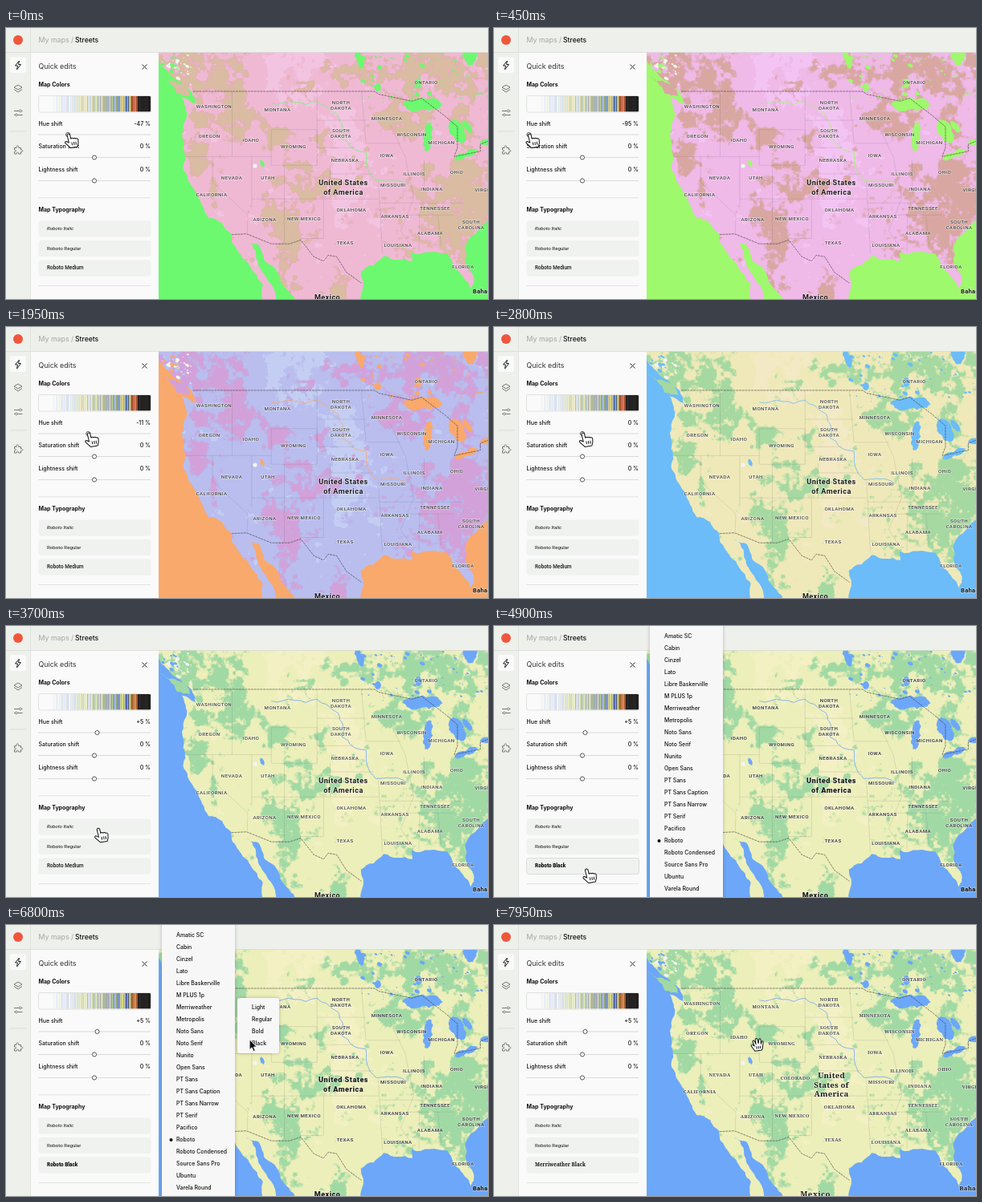
An HTML page with a canvas that plays this animation: 600 px wide and 338 px high, repeating every 8000 ms.

```html
<!DOCTYPE html>
<html lang="en">
<head>
<meta charset="utf-8">
<title>Map style editor</title>
<style>
  html, body { margin: 0; width: 100%; height: 100%; overflow: hidden; background: #fafafa; }
  canvas { display: block; width: 100vw; height: 100vh; }
</style>
</head>
<body>
<canvas id="stage" width="600" height="338"></canvas>
<script>
const W = 600, H = 338, LOOP = 8000;
const ctx = document.getElementById('stage').getContext('2d');
const UI = 'Inter, sans-serif', ROBOTO = 'Roboto, sans-serif', SERIF = '"Noto Serif", serif';

// Timing: keys are [ms, value...]
const HUE_KEYS = [[0, -47], [450, -95], [750, -97], [950, -100], [1650, -100], [1950, -11], [2150, 0], [2900, 0], [3200, 5]];
const CURSOR_KEYS = [[3350, 114, 133], [3900, 115, 303], [5100, 115, 303], [6000, 248, 182],
  [6450, 240, 105], [6900, 312, 148], [7400, 328, 149]];
const MENU_OPEN = 4300, BLACK_AT = 4600, SERIF_AT = 7050, MAP_LAG = 300, DEGREES_PER_PERCENT = 1.8;
const SUBMENUS = [
  { from: 5850, to: 6200, row: 13, items: ['Regular', 'Bold'] },
  { from: 6450, to: SERIF_AT, row: 6, items: ['Light', 'Regular', 'Bold', 'Black'] }
];

const smooth = u => u * u * (3 - 2 * u);
function track(keys, t) {
  const i = keys.findIndex(k => k[0] > t);
  if (i === 0) return keys[0].slice(1);
  if (i < 0) return keys[keys.length - 1].slice(1);
  const a = keys[i - 1], b = keys[i], e = smooth((t - a[0]) / (b[0] - a[0]));
  return a.slice(1).map((v, j) => v + (b[j + 1] - v) * e);
}
const hueAt = t => track(HUE_KEYS, t)[0];

// Noise
function hash(x, y, s) {
  const v = Math.sin(x * 127.1 + y * 311.7 + s * 74.7) * 43758.5453;
  return v - Math.floor(v);
}
function noise(x, y, s) {
  const ix = Math.floor(x), iy = Math.floor(y), u = smooth(x - ix), v = smooth(y - iy);
  const row = j => hash(ix, j, s) * (1 - u) + hash(ix + 1, j, s) * u;
  return row(iy) * (1 - v) + row(iy + 1) * v;
}
const fbm = (x, y, s) => noise(x / 22, y / 22, s) * .38 + noise(x / 10, y / 10, s + 1) * .3 +
  noise(x / 4.5, y / 4.5, s + 2) * .22 + noise(x / 2, y / 2, s + 3) * .1;

// Ground cover: noise raised inside soft ellipses [x, y, rx, ry]
function coverMask(regions, seed, threshold) {
  const c = document.createElement('canvas');
  c.width = W; c.height = H;
  const g = c.getContext('2d'), img = g.createImageData(W, H);
  for (let y = 30; y < H; y++) for (let x = 190; x < W; x++) {
    const bias = regions.reduce((sum, [cx, cy, rx, ry]) =>
      sum + Math.exp(-(((x - cx) / rx) ** 2) - ((y - cy) / ry) ** 2), 0);
    const v = fbm(x, y, seed) + Math.min(.34, bias * .32);
    img.data[(y * W + x) * 4 + 3] = 255 * Math.max(0, Math.min(1, (v - threshold) * 22));
  }
  g.putImageData(img, 0, 0);
  return c;
}
const WOODED = [
  [235, 50, 58, 38], [530, 55, 90, 42], [500, 112, 45, 18],          // northern forest
  [237, 140, 11, 55], [258, 208, 8, 28], [300, 112, 28, 30],         // western ranges
  [335, 148, 16, 26], [372, 208, 30, 46], [328, 228, 15, 36],
  [550, 240, 68, 50], [590, 185, 35, 35],                            // east
  [345, 308, 18, 38], [410, 330, 18, 14]                             // south
];
const forest = coverMask(WOODED, 3, .72), scrub = coverMask(WOODED, 3, .67);
const prairie = coverMask([[350, 50, 42, 34], [415, 110, 36, 36], [420, 190, 45, 45]], 11, .72);

// Mercator projection fitted to the stage
const mercator = lat => Math.log(Math.tan(Math.PI / 4 + lat * Math.PI / 360));
const project = (lon, lat) => [375 + 8.13 * (lon + 105.5), 79 + 466 * (mercator(49) - mercator(lat))];
const places = s => s.split(' ').map(p => project(...p.split(',').map(Number)));

function roughen(points, depth = 3, amount = .13) {
  for (; depth; depth--) {
    points = points.flatMap((p, i) => {
      const q = points[i + 1];
      if (!q) return [p];
      const k = (hash(p[0], q[1], depth) - .5) * 2 * amount;
      return [p, [(p[0] + q[0]) / 2 + (q[1] - p[1]) * k, (p[1] + q[1]) / 2 - (q[0] - p[0]) * k]];
    });
  }
  return points;
}
const toPath = pts => new Path2D('M' + pts.map(p => p.join(' ')).join('L'));
const coast = s => toPath(roughen(places(s)));
const border = s => toPath(places(s));
function lake(lon, lat, rx, ry, turn = 0) {
  const [x, y] = project(lon, lat), pts = [];
  for (let i = 0; i <= 10; i++) {
    const a = i * Math.PI / 5, u = rx * Math.cos(a), v = ry * Math.sin(a);
    pts.push([x + u * Math.cos(turn) - v * Math.sin(turn), y + u * Math.sin(turn) + v * Math.cos(turn)]);
  }
  return toPath(roughen(pts, 2, .2));
}
function scatter(count, x, y, w, h, size, seed) {
  const path = new Path2D();
  for (let i = 0; i < count; i++) {
    const px = x + hash(i, 1, seed) * w, py = y + hash(i, 2, seed) * h, r = .4 + hash(i, 3, seed) ** 3 * size;
    path.moveTo(px + r * 1.6, py);
    path.ellipse(px, py, r * 1.6, r, .5, 0, 7);
  }
  return path;
}

const WATER = [
  coast('-140,54 -130.5,54.2 -127.8,51.5 -125,50 -123.2,49 -122.5,47.6 -124.7,48.4 -124,46.2 -124.5,42.8 -124.4,40.4 -122.5,37.8 -120.6,34.6 -118.5,34 -117.1,32.5 -116,30.2 -114.2,28.2 -112.3,25.8 -111.5,20 -140,20'),
  coast('-114.8,31.8 -113,31.2 -112,29 -109.2,25.8 -107,22 -109.5,22 -111.5,26.3 -113,28.5 -114.8,31.8'),
  coast('-97.8,22 -97.3,27.6 -93.8,29.7 -89.4,29 -89.5,30.2 -84,30 -82.6,27.8 -80.4,25.2 -80,26.8 -81.3,31 -77,34.6 -70,35 -70,20'),
  lake(-87.8, 47.6, 25, 8), lake(-87, 44.2, 6, 19, .12), lake(-82.5, 44.8, 9, 16, -.5), lake(-81, 45.3, 4, 9, -.7),
  lake(-81.2, 42.2, 16, 4, -.4), lake(-77.8, 43.6, 10, 4), lake(-80.5, 53, 9, 20), lake(-97.5, 52.2, 4, 13, -.3),
  lake(-94.7, 49.4, 4, 5), lake(-88.5, 49.8, 4, 6), lake(-112.4, 41.2, 2.3, 5, -.4),
  scatter(70, 440, 31, 160, 62, 1.8, 5), scatter(26, 190, 36, 26, 30, 1.5, 9)
];
const ISLAND = coast('-128.3,50.7 -125,49.8 -123.4,48.5 -125.5,48.8 -128.3,50.7');
const SNOW = scatter(28, 194, 34, 38, 40, 1.6, 21);
const RIVER = coast('-111,47.8 -104,48 -100.7,46.5 -100.2,44 -96.5,42.5 -95,39.2 -90.2,38.7');
const NATIONS = [
  '-123,49 -95.2,49 -94.5,48.7 -89.5,48 -88,48.3 -84.5,46.5 -82.5,45.3 -82.5,43 -83,42 -79,42.6 -79,43.4 -76,44.2',
  '-117.1,32.5 -114.8,32.6 -111,31.3 -108.2,31.3 -106.5,31.8 -104.5,29.6 -103,29 -102.3,29.8 -101,29.6 -99.5,27.5 -97.2,26'
].map(border);
const STATES = [
  '-117,49 -117,42', '-124.2,42 -111,42', '-120,42 -120,39 -114.6,35 -114.7,32.7', '-114,42 -114,36',
  '-111,45 -111,41 -104,41 -104,45 -111,45', '-109,41 -109,31.4', '-114,37 -94.6,37', '-104,49 -104,43 -98.5,43',
  '-104,46 -96.5,46', '-102,41 -102,37', '-102,40 -95.3,40', '-103,37 -103,32 -106.6,32',
  '-97.2,49 -96.5,43.5 -91.2,43.5', '-94.6,39 -94,30', '-94.5,36.5 -81.7,36.5',
  '-92.8,45.5 -90.5,42 -89.2,37 -91.2,33 -89.6,31', '-90,35 -83,35', '-87.6,41.7 -87.6,38', '-88.3,35 -88.4,30.3', '-85.5,35 -85,31'
].map(border);

const LABELS = `WASHINGTON 259 98|MONTANA 338 102|NORTH 417 93|DAKOTA 417 100|MINNESOTA 474 113|ONTARIO 523 68
SOUTH 417 128|DAKOTA 417 135|WISCONSIN 505 133|MICHIGAN 542 143|OREGON 253 135|IDAHO 305 140|WYOMING 358 148
NEBRASKA 422 165|IOWA 474 159|ILLINOIS 508 182|OHIO 561 180|NEVADA 281 187|UTAH 326 187|MISSOURI 482 196
INDIANA 530 201|VIRGINIA 598 202|CALIFORNIA 256 208|OKLAHOMA 430 227|TENNESSEE 534 225|ARKANSAS 484 235
ARIZONA 322 239|NEW_MEXICO 371 238|ALABAMA 528 256|SOUTH 579 242|CAROLINA 579 249|TEXAS 422 268|LOUISIANA 488 271
FLORIDA 569 298`.split(/[|\n]/).map(s => s.split(' '));
const FONTS = ['Amatic SC', 'Cabin', 'Cinzel', 'Lato', 'Libre Baskerville', 'M PLUS 1p', 'Merriweather', 'Metropolis',
  'Noto Sans', 'Noto Serif', 'Nunito', 'Open Sans', 'PT Sans', 'PT Sans Caption', 'PT Sans Narrow', 'PT Serif',
  'Pacifico', 'Roboto', 'Roboto Condensed', 'Source Sans Pro', 'Ubuntu', 'Varela Round'];

// Drawing helpers
function text(str, x, y, font, color = '#111', align = 'left') {
  ctx.font = font; ctx.fillStyle = color; ctx.textAlign = align; ctx.textBaseline = 'middle';
  ctx.fillText(str, x, y);
}
function outline(color, width, path) {
  ctx.strokeStyle = color; ctx.lineWidth = width;
  path ? ctx.stroke(path) : ctx.stroke();
}
function rect(x, y, w, h, fill, radius = 0, stroke) {
  ctx.beginPath(); ctx.roundRect(x, y, w, h, radius);
  ctx.fillStyle = fill; ctx.fill();
  if (stroke) outline(stroke, .7);
}
function circle(x, y, r, fill, stroke) {
  ctx.beginPath(); ctx.arc(x, y, r, 0, 7);
  ctx.fillStyle = fill; ctx.fill();
  if (stroke) outline(stroke, 1);
}
function popup(x, y, w, h, radius) {
  ctx.save();
  ctx.shadowColor = 'rgba(0,0,0,.25)'; ctx.shadowBlur = 4;
  rect(x, y, w, h, '#f7f7f7', radius);
  ctx.restore();
}

const tintLayer = document.createElement('canvas');
tintLayer.width = W; tintLayer.height = H;
const tintCtx = tintLayer.getContext('2d');
function drawMask(mask, color) {
  tintCtx.globalCompositeOperation = 'copy';
  tintCtx.drawImage(mask, 0, 0);
  tintCtx.globalCompositeOperation = 'source-in';
  tintCtx.fillStyle = color;
  tintCtx.fillRect(0, 0, W, H);
  ctx.drawImage(tintLayer, 0, 0);
}

function mapLabel(str, x, y, font, spacing, color) {
  ctx.letterSpacing = spacing + 'px';
  ctx.font = font; ctx.textAlign = 'center'; ctx.textBaseline = 'middle'; ctx.lineJoin = 'round';
  ctx.strokeStyle = 'rgba(255,255,255,.45)'; ctx.lineWidth = 1.5;
  ctx.strokeText(str, x, y);
  text(str, x, y, font, color, 'center');
  ctx.letterSpacing = '0px';
}

function drawMap(t) {
  const shift = DEGREES_PER_PERCENT * hueAt(t - MAP_LAG);
  const tone = (h, s, l) => `hsl(${h + shift + 360} ${s}% ${l}%)`;
  const water = tone(206, 92, 70), wood = tone(114, 42, 74);
  rect(190, 30, 410, 308, tone(54, 62, 83));
  drawMask(prairie, tone(47, 66, 86));
  drawMask(scrub, tone(78, 50, 79));
  drawMask(forest, wood);
  ctx.fillStyle = '#f2f3ee';
  ctx.fill(SNOW);
  ctx.fillStyle = water;
  WATER.forEach(p => ctx.fill(p));
  outline(water, .8, RIVER);
  ctx.fillStyle = wood;
  ctx.fill(ISLAND);
  circle(310, 172, 2.6, '#f4f4f2');
  STATES.forEach(p => outline('rgba(90,90,100,.25)', .6, p));
  ctx.setLineDash([3, .8]);
  NATIONS.forEach(p => outline('rgba(60,55,60,.65)', .9, p));
  ctx.setLineDash([]);

  const serif = t >= SERIF_AT, black = t >= BLACK_AT;
  const small = serif ? `600 5.9px ${SERIF}` : `${black ? 700 : 500} 6.2px ${ROBOTO}`;
  const large = serif ? `900 9.6px ${SERIF}` : `${black ? 900 : 600} 9.1px ${ROBOTO}`;
  const state = (name, x, y) => mapLabel(name, x, y, small, serif ? .25 : .4, '#484848');
  LABELS.forEach(([name, x, y]) => state(name.replace('_', ' '), +x, +y));
  if (serif) state('COLORADO', 375, 191);
  const country = serif ? ['United', 'States of', 'America'] : ['United States', 'of America'];
  country.forEach((line, i) => mapLabel(line, 420, (serif ? 188 : 193.5) + i * 11.8, large, serif ? .2 : .5, '#1c1c1c'));
  mapLabel('Mexico', 400, 336.5, large, .4, '#1c1c1c');
  mapLabel('Bahamas', 598, 329, large.replace(/9\.\dpx/, '7.8px'), .2, '#1c1c1c');
}

const ICONS = [
  'M16.5 41 L11.5 47 H14.5 L13.5 52 L18.5 45.5 H15.5 Z',
  'M15 71 L20 74 L15 77 L10 74 Z M10 76.5 L15 80 L20 76.5',
  'M10 103.5 H16.5 M19 103.5 H20.5 M10 108.5 H11.5 M14 108.5 H20.5 M17.8 102 a1.4 1.4 0 1 0 .01 0 M12.8 107 a1.4 1.4 0 1 0 .01 0',
  'M10.5 149.5 H13 C12 146 16.5 146 15.8 149.5 H18.5 V152 C21.5 151.5 21.5 155 18.5 154.5 V157 H15.5 C16 154.5 13 154.5 13.3 157 H10.5 V154.3 C13 154.7 13 151.5 10.5 152 Z'
].map(d => new Path2D(d));

// Stripes run from white through pale and vivid tones to black
function drawPalette(shift) {
  const hues = [52, 210, 75, 225, 60, 215];
  for (let i = 0; i < 139; i++) {
    const u = i / 138, plain = u < .12 || u > .89;
    const hue = u > .82 ? 15 : hues[Math.floor(hash(i, 4, 1) * hues.length)];
    const sat = plain ? 4 : 15 + 50 * hash(i, 5, 1);
    const light = u < .12 ? 98 : plain ? 10 + hash(i, 6, 1) * 8 : 97 - 45 * u ** 2 - hash(i, 6, 1) * 36 * u ** 1.4;
    rect(41 + i, 85, 1.1, 19.5, `hsl(${hue + shift} ${sat}% ${light}%)`);
  }
  ctx.beginPath(); ctx.roundRect(40.5, 84.5, 140, 20.5, 2);
  outline('#d9dbd8', .8);
}

function slider(name, value, y) {
  const font = `500 7px ${UI}`;
  text(name, 40.5, y, font);
  text(`${value > 0 ? '+' : ''}${value} %`, 180, y, font, '#111', 'right');
  rect(40, y + 13, 140, 1, '#d9dbd8');
  circle(110 + value * .7, y + 13.5, 2.6, '#fff', '#555');
}

function drawPanel(t) {
  const hue = Math.round(hueAt(t));
  rect(0, 0, W, 30, '#eef0ec');
  rect(0, 30, 30, 308, '#eef0ec');
  rect(30, 30, 160, 308, '#fafafa');
  rect(0, 30, W, .7, '#d8dad6');
  rect(30, 0, .7, H, '#d8dad6');
  circle(15, 15, 6, '#f0563c');
  text('My maps /', 40.5, 15.5, `8.8px ${UI}`, '#a4a6a3');
  text('Streets', 86, 15.5, `500 8.6px ${UI}`);
  rect(5, 36, 20, 20, '#fafafa', 3);
  ICONS.forEach((p, i) => outline(i ? '#777' : '#222', 1, p));
  rect(5, 128.5, 20, .8, '#d4d6d2');

  text('Quick edits', 40.5, 48.5, `8.9px ${UI}`, '#333');
  ctx.beginPath();
  ctx.moveTo(169.5, 45.5); ctx.lineTo(175.5, 51.5); ctx.moveTo(175.5, 45.5); ctx.lineTo(169.5, 51.5);
  outline('#333', 1);
  text('Map Colors', 40.5, 71, `700 7px ${UI}`);
  drawPalette(t > 2900 ? hue * DEGREES_PER_PERCENT : 0);
  slider('Hue shift', hue, 119.5);
  slider('Saturation shift', 0, 148);
  slider('Lightness shift', 0, 177);
  rect(40, 211.5, 140, .8, '#d9dbd8');
  text('Map Typography', 40.5, 226.5, `700 7px ${UI}`);

  const hover = t > 3850 && t < 5150;
  for (let i = 0; i < 3; i++) rect(40.5, 240.5 + i * 24.5, 140, 20, '#f0f2ef', 3, hover && i === 2 ? '#cfd3cd' : null);
  text('Roboto Italic', 51, 250.5, `italic 6.1px ${ROBOTO}`);
  text('Roboto Regular', 51, 275, `6.2px ${ROBOTO}`);
  if (t >= SERIF_AT) text('Merriweather Black', 51, 299.5, `900 6.2px ${SERIF}`);
  else if (t >= BLACK_AT) text('Roboto Black', 51, 299.5, `900 6.4px ${ROBOTO}`);
  else text('Roboto Medium', 51, 299.5, `500 6.4px ${ROBOTO}`);
  rect(40, 321, 140, .8, '#d9dbd8');
}

function drawMenus(t) {
  if (t < MENU_OPEN || t >= SERIF_AT) return;
  const item = (name, x, y) => text(name, x, y + .3, `500 6.9px ${UI}`);
  popup(194, -5, 91, 350, 0);
  FONTS.forEach((name, i) => item(name, 212, 13 + 15 * i));
  circle(205.5, 268, 2, '#111');
  const sub = SUBMENUS.find(s => t >= s.from && t < s.to);
  if (!sub) return;
  const y = 13 + 15 * sub.row;
  popup(288, y - 12, 52, sub.items.length * 15 + 9, 3);
  sub.items.forEach((name, i) => item(name, 306, y + 15 * i));
}

const POINTER = new Path2D('M-1.6 1 Q0 -1 1.6 1 L2 6 Q3.5 4.6 5 6.2 Q6.5 5 7.6 6.8 Q9 6 10 7.8 L9.6 12 L8 16 H0 L-5 10 Q-5.5 8 -3.5 8.2 L-.8 10 Z M2.5 10 V13.5 M4.8 10 V13.5 M7 10 V13.5');
const OPEN_HAND = new Path2D('M-4 7 L-7 1 Q-7 -1 -5 0 L-3.6 1.5 L-5 -4 Q-4.5 -6 -3 -4.5 L-1.6 -.5 L-1.8 -6 Q-.5 -8 .6 -6 L1.2 -1 L2.4 -5.5 Q4 -7 4.4 -5 L4 0 L5.4 -2.8 Q7 -3.5 6.8 -1.5 L5 5 L4 7 Z M-1.5 2 V5 M.6 2 V5 M2.7 2 V5');
const ARROW = new Path2D('M0 0 V13 L3 10.2 L5 15 L7.2 14 L5.2 9.4 H9.2 Z');

function drawCursor(t) {
  const [x, y] = t < 3350 ? [110.5 + hueAt(t) * .7, 132] : track(CURSOR_KEYS, t);
  const arrow = t >= 5200 && t < SERIF_AT, open = t >= SERIF_AT;
  const path = arrow ? ARROW : open ? OPEN_HAND : POINTER;
  ctx.save();
  ctx.translate(x, y);
  if (!arrow) { ctx.rotate(-.15); ctx.scale(1.1, 1.1); }
  ctx.lineJoin = 'round';
  ctx.fillStyle = arrow ? '#111' : '#fff';
  ctx.fill(path);
  outline(arrow ? '#fff' : '#111', .9, path);
  ctx.restore();
}

function frame(now) {
  const t = now % LOOP;
  drawMap(t);
  drawPanel(t);
  drawMenus(t);
  drawCursor(t);
  requestAnimationFrame(frame);
}
requestAnimationFrame(frame);
</script>
</body>
</html>
```
